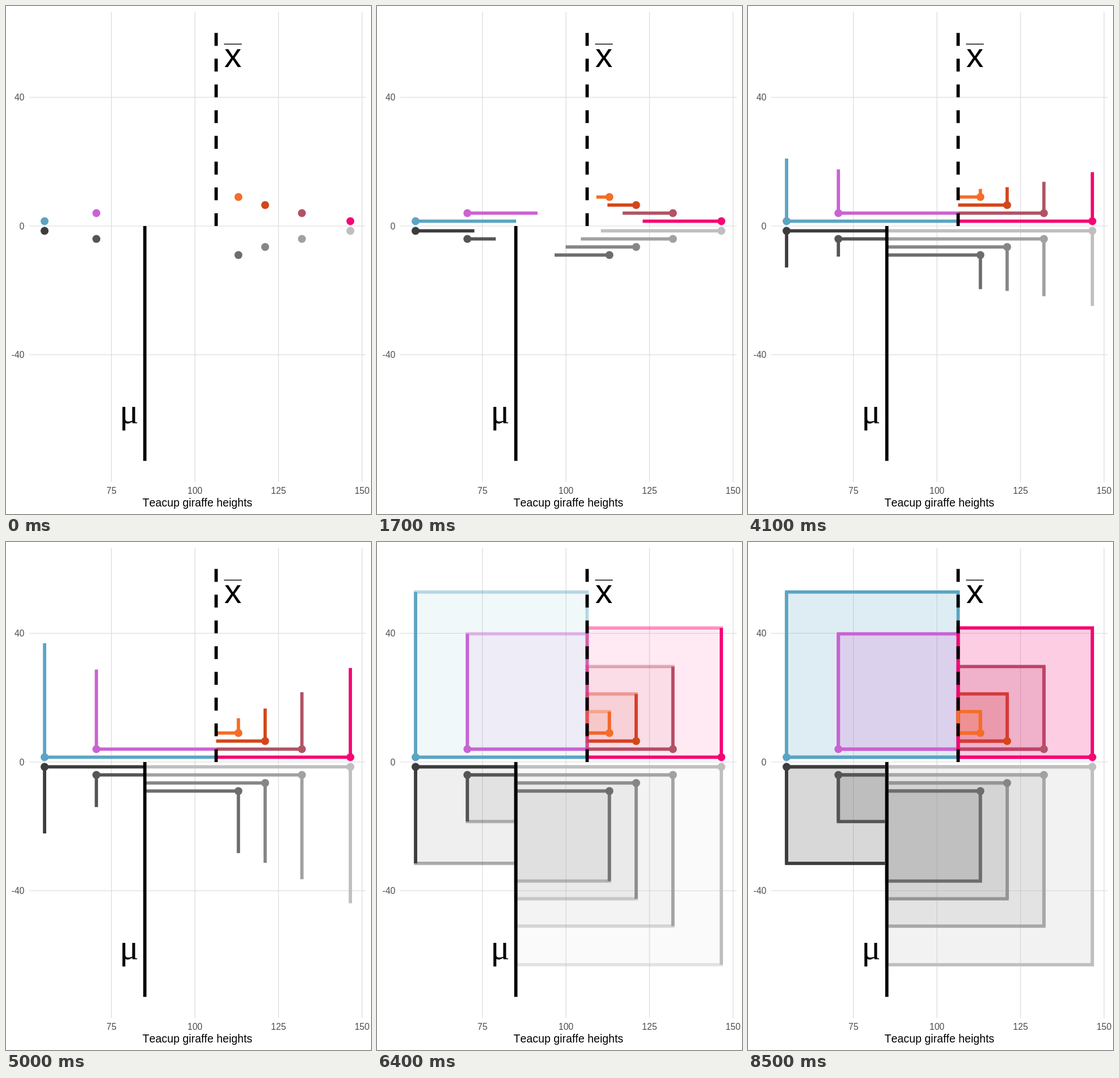
An HTML page for the animation above (8.6 s loop, 635x882 px).

```html
<!DOCTYPE html>
<html lang="en">
<head>
<meta charset="utf-8">
<title>Squared distances</title>
<style>
  html, body { margin: 0; width: 100%; height: 100%; overflow: hidden; background: #fff; }
  svg { display: block; width: 635px; height: 882px; }
  text { font-family: "Liberation Sans", Arial, sans-serif; font-kerning: none; }
  .tick { font-size: 15.6px; fill: #4d4d4d; }
  .mid { text-anchor: middle; }
  .end { text-anchor: end; }
  .mu { font: 62px "Liberation Serif", "Times New Roman", serif; }
</style>
</head>
<body>
<svg id="plot" viewBox="0 0 635 882"></svg>
<script>
const STEP = 100, FRAMES = 86, LINE = 5.7;
const MEAN = 638 / 6, MU = 85;
const px = v => 183.4 + (v - 75) * 5.814;
const py = v => 382 - v * 5.587;

// value, height above the axis, colour, grey
const points = [
  [55, 1.5, '#5ca4c3', '#3c3c3c'],
  [70.5, 4, '#cb62d3', '#555555'],
  [121, 6.5, '#d3461a', '#868686'],
  [132, 4, '#b15365', '#a1a1a1'],
  [146.5, 1.5, '#f50673', '#bfbfbf'],
  [113, 9, '#f66d26', '#6d6d6d']
];

const plot = document.getElementById('plot');
function add(tag, attrs, parent = plot) {
  const el = document.createElementNS('http://www.w3.org/2000/svg', tag);
  set(el, attrs);
  return parent.appendChild(el);
}
function set(el, attrs) {
  for (const k in attrs) el.setAttribute(k, attrs[k]);
}
function line(x1, y1, x2, y2, stroke, width, parent) {
  return add('line', { x1, y1, x2, y2, stroke, 'stroke-width': width }, parent);
}
function label(s, x, y, attrs) {
  add('text', { x, y, ...attrs }).textContent = s;
}

// Grid and axes
for (const v of [75, 100, 125, 150]) {
  line(px(v), 10, px(v), 826.5, '#d9d9d9', 1.15);
  label(v, px(v), 847, { class: 'tick mid' });
}
for (const v of [-40, 0, 40]) {
  line(40.5, py(v), 626, py(v), '#d9d9d9', 1.15);
  label(v, 32, py(v) + 5.6, { class: 'tick end' });
}
label('Teacup giraffe heights', 333, 869, { class: 'mid', 'font-size': 19.3 });

// Layers: segments, squares, centre lines, dots
const segments = add('g', {}), squares = add('g', {});
const centres = add('g', {}), dots = add('g', {});

const marks = [];
for (const side of [1, -1]) {
  for (const [v, h, colour, grey] of points) {
    const ink = side > 0 ? colour : grey;
    const x = px(v), y = py(side * h);
    const centre = side > 0 ? MEAN : MU;
    const cx = px(centre);
    const top = py(side * (h + Math.abs(v - centre)));
    marks.push({
      x, y, cx, top,
      across: line(x, y, x, y, ink, LINE, segments),
      up: line(x, y, x, y, ink, LINE, segments)
    });
    add('rect', {
      x: Math.min(x, cx), y: Math.min(y, top),
      width: Math.abs(cx - x), height: Math.abs(top - y),
      fill: ink, 'fill-opacity': 0.2, stroke: ink, 'stroke-width': LINE, class: 'square'
    }, squares);
    add('circle', { cx: x, cy: y, r: 6.9, fill: ink }, dots);
  }
}
const boxes = [...squares.children];

line(px(MU), py(0), px(MU), py(-73), '#000', LINE, centres);
set(line(px(MEAN), py(60), px(MEAN), py(0), '#000', LINE, centres),
  { 'stroke-dasharray': 22.35 });
label('x', 394.7, 105.5, { class: 'mid', 'font-size': 60 });
line(379.3, 66.2, 410.3, 66.2, '#000', 1.4);
label('μ', 214, 724, { class: 'mid mu' });

const clamp = v => Math.max(0, Math.min(1, v));

function draw(now) {
  const f = Math.floor(now / STEP) % FRAMES;
  const across = clamp(f / 29);
  const up = clamp((f - 30) / 29);
  const fade = clamp((f - 59) / 12);
  for (const m of marks) {
    set(m.across, { x2: m.x + (m.cx - m.x) * across });
    set(m.up, { y2: m.y + (m.top - m.y) * up });
  }
  for (const b of boxes) set(b, { 'fill-opacity': 0.2 * fade, 'stroke-opacity': fade });
}

let start;
function tick(now) {
  start ??= now;
  draw(now - start);
  requestAnimationFrame(tick);
}
draw(0);
requestAnimationFrame(tick);
</script>
</body>
</html>
```
